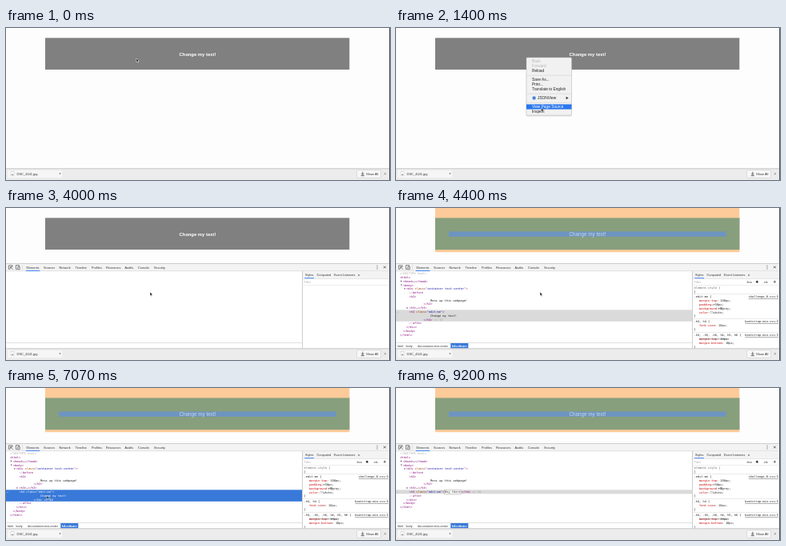
Animation of 480 by 190 pixels, one loop 9270 ms. Source, as an HTML page:

```html
<!DOCTYPE html>
<html lang="en">
<head>
<meta charset="utf-8">
<title>Inspect and edit</title>
<style>
html, body { margin: 0; width: 100%; height: 100%; overflow: hidden; background: #fdfdfd; }
svg { display: block; width: 480px; height: 190px; }
text { white-space: pre; font-family: "Liberation Sans", Arial, sans-serif; fill: #333; }
.mono { font-family: "DejaVu Sans Mono", Menlo, monospace; font-size: 3.65px; fill: #222; }
.tag { fill: #881280; }
.attr { fill: #994500; }
.val { fill: #1a1aa6; }
.dim { fill: #aaa; }
.prop { fill: #c80000; }
.lit text, .lit tspan { fill: #fff; }
</style>
</head>
<body>
<svg id="stage" viewBox="0 0 480 190"></svg>
<script>
const LOOP = 9270, FRAME = 1000 / 15;
const BLUE = '#3879d9';
const PITCH = 4.78;
const TYPED = 'Hey there';

const rect = (x, y, w, h, fill, more = '') =>
  `<rect x="${x}" y="${y}" width="${w}" height="${h}" fill="${fill}" ${more}/>`;
const text = (x, y, size, str, more = '') =>
  `<text x="${x}" y="${y}" font-size="${size}" ${more}>${str}</text>`;
const mono = (x, y, str, more = '') => `<text class="mono" x="${x}" y="${y}" ${more}>${str}</text>`;
const path = (d, stroke, width = 0.6, fill = 'none') =>
  `<path d="${d}" stroke="${stroke}" stroke-width="${width}" fill="${fill}"/>`;
const group = (id, body) => `<g id="${id}">${body}</g>`;
const span = (cls, str) => `<tspan class="${cls}">${str}</tspan>`;

// Page and its inspection overlay
const title = (fill, weight, size) =>
  text(239.5, 34.5, size, 'Change my text!', `text-anchor="middle" font-weight="${weight}" style="fill:${fill}"`);

const page = rect(0, 0, 480, 190, '#fdfdfd') + rect(49, 12.4, 380.3, 39.6, '#808080') +
  title('#fff', 700, 5.9);

const overlay = rect(49, 0, 380.3, 55.2, '#fdcb99') + rect(49, 12.4, 380.3, 39.8, '#879f7d') +
  rect(66, 29.4, 346.5, 6.4, '#6e95c1') + title('#c8d8e6', 400, 6.3);

// Download shelf
const shelf = rect(0, 175.5, 480, 14.5, '#ececec') + rect(0, 175.5, 480, 0.7, '#b8b8b8') +
  rect(1.5, 177.3, 69.5, 10.4, '#f6f6f6', 'rx="1.2" stroke="#ddd" stroke-width=".4"') +
  rect(6, 179.5, 4, 5.4, '#fff', 'stroke="#bbb" stroke-width=".4"') +
  path('M6.8 184L8 182L9.4 184Z', 'none', 0, '#888') +
  text(13.5, 183.8, 4, 'DSC_4141.jpg') +
  path('M66.3 181.4h2.4l-1.2 1.6z', 'none', 0, '#555') +
  rect(438.5, 177.6, 30, 9.6, '#f8f8f8', 'rx="1.2" stroke="#c4c4c4" stroke-width=".5"') +
  path('M445.8 179.8v3.2M444.2 181.8l1.6 1.7 1.6-1.7M443.7 184.6h4.2', '#444', 0.8) +
  text(450, 183.8, 4, 'Show All') +
  path('M472.6 181l2.4 2.4M475 181l-2.4 2.4', '#777', 0.6);

// Context menu: [label, centre, kind]
const ITEMS = [
  ['Back', 41.5, 0], ['Forward', 47.5, 0], ['Reload', 53.5, 1], ['Save As...', 64.5, 1],
  ['Print...', 70.5, 1], ['Translate to English', 76.5, 1], ['JSONView', 87.5, 1],
  ['View Page Source', 98.5, 1], ['Inspect', 104.5, 1]
];
const menu = rect(162.6, 37.6, 57.4, 73, '#000', 'rx="1.5" opacity=".12"') +
  rect(163, 37, 56.5, 72, '#f1f1f1', 'rx="1.2" stroke="#bcbcbc" stroke-width=".5"') +
  [59.2, 82.2, 93.2].map(y => rect(163.2, y - 0.4, 56.1, 0.7, '#d8d8d8')).join('') +
  rect(163, 0, 56.5, 6.2, '#2a76ee', 'id="bar"') +
  '<circle cx="172.6" cy="87.5" r="2.2" fill="#4a86d8"/>' +
  path('M212.6 85.7l3 1.8-3 1.8z', 'none', 0, '#333') +
  ITEMS.map(([label, y], i) =>
    text(label === 'JSONView' ? 177 : 170, y + 1.7, 4.8, label, `id="item${i}"`)).join('');

// Developer tools
const tabs = [['Elements', 25.5], ['Sources', 47], ['Network', 66.5], ['Timeline', 86.5],
  ['Profiles', 107], ['Resources', 125], ['Audits', 148.5], ['Console', 165], ['Security', 185]];
const frameBars = rect(0, 69, 478.6, 10, '#f3f3f3') + rect(0, 69, 478.6, 0.6, '#b5b5b5') +
  rect(0, 78.6, 478.6, 0.5, '#ccc') +
  tabs.map(([s, x]) => text(x, 75.6, 3.85, s)).join('') +
  rect(24.8, 77.9, 17.5, 1, '#3e82f7') + rect(20, 71, 0.5, 6.4, '#ccc') +
  path('M5 76.4H3.4V71.8H8V73.4M5.4 73.6l3.4 3.2M5.4 73.6v2.6M5.4 73.6h2.6', '#555', 0.7) +
  path('M12.4 71.6h4v1.4M12.4 71.6v5h2M14.8 73.4h2.4v3.4h-2.4z', '#555', 0.7) +
  [72, 74, 76].map(y => `<circle cx="464" cy="${y}" r=".6" fill="#555"/>`).join('') +
  path('M472 72.6l2.8 2.8M474.8 72.6l-2.8 2.8', '#444', 0.8) +
  rect(370, 79, 108.6, 9, '#f3f3f3') + rect(370, 88, 108.6, 0.5, '#ccc') +
  rect(370, 79, 0.7, 96.5, '#bbb') +
  [['Styles', 374], ['Computed', 388.5], ['Event Listeners', 410]]
    .map(([s, x]) => text(x, 84.9, 3.85, s)).join('') +
  text(439.8, 84.9, 4.6, '»') + rect(373.2, 87.2, 11.8, 0.9, '#3e82f7') +
  text(372.5, 93.6, 3.85, 'Filter', 'class="dim"') + rect(370.5, 96.2, 108, 0.5, '#ddd') +
  rect(0, 168.4, 370, 0.6, '#ccc');

const crumbs = text(2, 173.5, 3.7, 'html') + text(12.5, 173.5, 3.7, 'body') +
  text(27, 173.5, 3.6, 'div.container.text-center') +
  rect(68.3, 169, 22, 6.5, BLUE) +
  text(70, 173.5, 3.7, 'h4.edit-me', 'style="fill:#fff" font-weight="700"');

const decl = (y, name, value, more = '') =>
  mono(379, y, span('prop', name) + ':' + value, more);
const swatch = (x, y, fill) => rect(x, y - 2.5, 2.4, 2.4, fill, 'stroke="#777" stroke-width=".3"');
const link = (y, s) => mono(478, y, s, 'text-anchor="end" text-decoration="underline"');
const fold = (x, y) => path(`M${x} ${y - 2.3}l1.8 1.1-1.8 1.1z`, 'none', 0, '#666');
const styles = text(438, 93.6, 3.85, ':hov') + text(459, 93.6, 3.85, '.cls') +
  path('M449.6 92.2l1.7-1.7 1.7 1.7-1.7 1.7z', 'none', 0, '#333') +
  path('M471.8 92.2h3.2M473.4 90.6v3.2', '#444', 0.7) +
  [107.4, 138.2, 155.2].map(y => rect(370.5, y, 108, 0.4, '#ccc')).join('') +
  mono(372.5, 101.2, 'element.style {', 'style="fill:#666"') + mono(372.5, 106, '}') +
  mono(372.5, 112.4, '.edit-me {') + link(112.4, 'challenge_0.css:5') +
  decl(117.2, 'margin-top', ' 100px;') +
  decl(122, 'padding', ' 50px;') + fold(396.8, 122) +
  decl(126.9, 'background', '  grey;') + fold(403.2, 126.9) + swatch(405.3, 126.9, '#808080') +
  decl(131.7, 'color', '  white;') + swatch(393.6, 131.7, '#fff') +
  mono(372.5, 136.4, '}') +
  mono(372.5, 143.4, '.h4, h4 {') + link(143.4, 'bootstrap.min.css:5') +
  decl(148.3, 'font-size', ' 18px;') + mono(372.5, 153, '}') +
  mono(372.5, 160.2, '.h4, .h5, .h6, h4, h5, h6 {') + link(160.2, 'bootstrap.min.css:5') +
  decl(164.9, 'margin-top', ' 10px;', 'text-decoration="line-through"') +
  decl(169.7, 'margin-bottom', ' 10px;') + mono(372.5, 174.5, '}');

// Element tree
const rowY = i => 83.2 + i * PITCH;
const row = (i, x, str) => mono(x, rowY(i), str);
const tag = (name, cls) => span('tag', '&lt;' + name) +
  (cls ? ' ' + span('attr', 'class') + span('tag', '="') + span('val', cls) + span('tag', '"') : '') +
  span('tag', '&gt;');
const arrow = (i, x, open) => path(
  open ? `M${x} ${rowY(i) - 2.1}h2.2l-1.1 1.8z` : `M${x} ${rowY(i) - 2.4}v2.3l1.8-1.15z`, 'none', 0, '#666');
const BAND = rowY(10) - 3.7;

const treeTop = row(0, 5, span('dim', '&lt;!DOCTYPE html&gt;')) + row(1, 5, tag('html')) +
  arrow(2, 5.8) + row(2, 8.7, tag('head') + '…' + tag('/head')) +
  arrow(3, 5.6, true) + row(3, 8.7, tag('body')) +
  arrow(4, 9.8, true) + row(4, 12.8, tag('div', 'container text-center')) +
  row(5, 16.5, span('tag', '::before')) + row(6, 16.5, tag('h2')) +
  row(7, 43, 'Mess up this webpage!') + row(8, 34.5, tag('/h2')) +
  arrow(9, 13.4) + row(9, 16.5, tag('h3') + '…' + tag('/h3'));
const treeEnd = row(13, 16.5, span('tag', '::after')) + row(14, 12.8, tag('/div')) +
  row(15, 8.7, tag('/body')) + row(16, 5, tag('/html'));
const field = rect(60.3, 0, 0, 5, '#fff', 'id="field" stroke="#999" stroke-width=".5"') +
  rect(43, rowY(11) - 3.2, 33, 4.2, '#b5d5ff', 'id="pick"');
const node = group('head', row(10, 1, span('dim', '…')) + row(10, 16.5, tag('h4', 'edit-me'))) + field +
  group('wrapped', row(11, 43, 'Change my text!') + row(12, 34.5, tag('/h4') + span('dim', ' == $0'))) +
  group('inline', mono(61, rowY(10), '', 'id="typed"') +
    `<g id="tail">${mono(0, rowY(10), tag('/h4') + span('dim', ' == $0'))}</g>`);
const tree = treeTop + rect(0, BAND, 370, 14.5, '#dadada', 'id="band"') +
  group('node', node) + group('treeEnd', treeEnd);

const stage = document.getElementById('stage');
stage.innerHTML = page + group('overlay', overlay) +
  group('tools', rect(0, 69, 478.6, 106.5, '#fff') + group('bars', frameBars) +
    group('tree', tree + crumbs) + group('styles', styles)) +
  shelf + rect(479, 0, 1, 190, '#555') + group('menu', menu) +
  group('cursor', path('M0 0V4.7L1.1 3.7 1.9 5.5 2.7 5.1 1.9 3.4H3.4Z', '#fff', 0.5, '#111'));

const $ = id => document.getElementById(id);
const show = (id, on) => $(id).setAttribute('display', on ? 'inline' : 'none');
const set = (id, attrs) => { for (const k in attrs) $(id).setAttribute(k, attrs[k]); };
const ease = p => p * p * (3 - 2 * p);

// Pointer moves: [start, end, x, y]
const MOVES = [[6, 20, 181.6, 100], [21, 26, 180, 105], [79, 92, 51.3, 134.6], [94, 95, 51.1, 134.4]];
function pointer(n) {
  let x = 163, y = 38;
  for (const [a, b, tx, ty] of MOVES) {
    const p = ease(Math.min(1, Math.max(0, (n - a) / (b - a))));
    x += (tx - x) * p;
    y += (ty - y) * p;
  }
  return [x, y];
}

function draw(t) {
  const n = Math.floor((t + 4) / FRAME);
  const [x, y] = pointer(n);

  show('menu', n >= 1 && n < 48);
  set('menu', { opacity: n < 46 ? 1 : n === 46 ? 0.65 : 0.3 });
  const blink = n === 44;
  const hot = blink ? -1 : ITEMS.findIndex(([, c, on]) => on && Math.abs(y + 0.4 - c) <= 3);
  show('bar', hot >= 0);
  if (hot >= 0) set('bar', { y: ITEMS[hot][1] - 3.1 });
  ITEMS.forEach(([, , on], i) => {
    $('item' + i).style.fill = i === hot ? '#fff' : on ? '#222' : '#b8b8b8';
  });

  show('tools', n >= 59);
  show('bars', n >= 60);
  show('tree', n >= 62);
  show('styles', n >= 63);
  show('overlay', (n >= 64 && n < 80) || n >= 105);

  const editing = n >= 127, typing = n >= 129, lit = n >= 104 && !editing;
  const typed = TYPED.slice(0, Math.max(0, Math.ceil((n - 128) * 0.9 - 1e-6)));
  const width = typed.length * 2.2;
  set('band', { fill: lit ? BLUE : '#dadada', height: typing ? 5 : 14.5 });
  set('node', { class: lit ? 'lit' : '' });
  show('wrapped', !typing);
  show('inline', typing);
  show('field', editing);
  show('pick', editing && !typing);
  set('field', typing
    ? { x: 60.3, y: BAND, width: width + 1.5 }
    : { x: 42.2, y: rowY(11) - 3.6, width: 34.6 });
  $('typed').textContent = typed;
  set('tail', { transform: `translate(${62.3 + width} 0)` });
  set('treeEnd', { transform: `translate(0 ${typing ? -2 * PITCH : 0})` });

  show('cursor', !typing);
  set('cursor', { transform: `translate(${x} ${y})` });
}

const start = performance.now();
function tick() {
  draw((performance.now() - start) % LOOP);
  requestAnimationFrame(tick);
}
tick();
</script>
</body>
</html>
```
